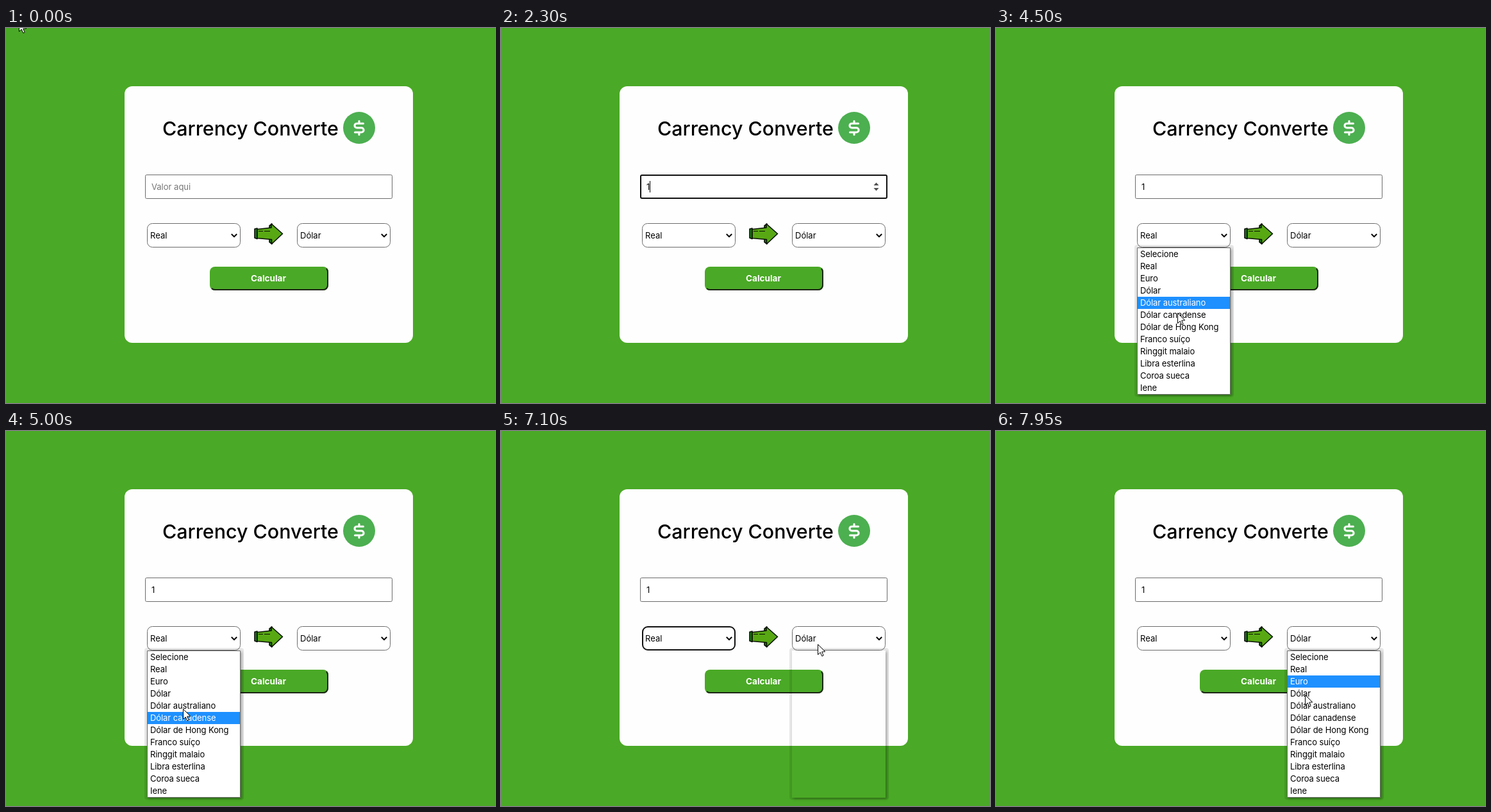
An HTML page with a canvas that plays this animation: 763 by 586 pixels, repeating every 8 s.

```html
<!DOCTYPE html>
<html lang="pt">
<head>
<meta charset="utf-8">
<title>Converter</title>
<style>
html, body { margin: 0; width: 100%; height: 100%; overflow: hidden; background: #4aa926; }
canvas { display: block; }
</style>
</head>
<body>
<canvas id="stage" width="763" height="586"></canvas>
<script>
const ctx = document.getElementById('stage').getContext('2d');
const LOOP = 8000, STEP = 50;
const GREEN = '#4aa926';
const OPTIONS = ['Selecione', 'Real', 'Euro', 'Dólar', 'Dólar australiano', 'Dólar canadense',
  'Dólar de Hong Kong', 'Franco suíço', 'Ringgit malaio', 'Libra esterlina', 'Coroa sueca', 'Iene'];
const ROW = 19, LIST_TOP = 343, LIST_H = OPTIONS.length * ROW + 2, LIST_W = 146;

const FOCUS = 1400, TYPE = 2300, BLINK = 475, POINTER_BACK = 3150;
const LIST_DELAY = 250, HOVER_LAG = 100;
const SELECTS = [
  { x: 220, label: 'Real', open: 3650, close: 6350 },
  { x: 454, label: 'Dólar', open: 7100, close: LOOP }
];

// Pointer moves; it rests in between
const HOME = { x: 20, y: -11 };
const MOVES = [
  { from: 350, to: 850, x: 462, y: 360 },
  { from: 850, to: 1000, x: 480, y: 307 },
  { from: TYPE, to: POINTER_BACK, x: 386, y: 322 },
  { from: POINTER_BACK, to: 3400, x: 300, y: 327 },
  { from: 3600, to: 3800, x: 291, y: 337 },
  { from: 4050, to: 4590, x: 281, y: 466 },
  { from: 4700, to: 5400, x: 269, y: 392 },
  { from: 5600, to: 5750, x: 268, y: 376 },
  { from: 6350, to: 6900, x: 494, y: 333 },
  { from: 7450, to: 7950, x: 482, y: 412 }
];

const between = (t, a, b) => t >= a && t < b;

function pointerAt(t) {
  let { x, y } = HOME;
  for (const m of MOVES) {
    const p = Math.min(1, Math.max(0, (t - m.from) / (m.to - m.from)));
    x += (m.x - x) * p;
    y += (m.y - y) * p;
  }
  return { x: Math.round(x), y: Math.round(y) };
}

// The highlight trails the pointer a little
function activeRow(t, label) {
  const row = Math.floor((pointerAt(t - HOVER_LAG).y - LIST_TOP - 1) / ROW);
  return row < 0 ? OPTIONS.indexOf(label) : row;
}

function text(str, x, y, { size = 13, weight = 400, color = '#000', spacing = 0, align = 'left' } = {}) {
  ctx.font = `${weight} ${size}px Inter, "Open Sans", sans-serif`;
  ctx.letterSpacing = spacing + 'px';
  ctx.textAlign = align;
  ctx.fillStyle = color;
  ctx.fillText(str, x, y);
}

function box(x, y, w, h, r, fill) {
  ctx.beginPath();
  ctx.roundRect(x, y, w, h, r);
  ctx.fillStyle = fill;
  ctx.fill();
}

function frame(x, y, w, h, r, focus) {
  const line = focus ? 2 : 1;
  box(x + line / 2, y + line / 2, w - line, h - line, r, '#fff');
  ctx.strokeStyle = focus ? '#101010' : '#6b6b6b';
  ctx.lineWidth = line;
  ctx.stroke();
}

function path(d, fill, stroke, width = 1) {
  const p = new Path2D(d);
  if (fill) {
    ctx.fillStyle = fill;
    ctx.fill(p);
  }
  if (stroke) {
    ctx.strokeStyle = stroke;
    ctx.lineWidth = width;
    ctx.stroke(p);
  }
}

function drawCoin() {
  ctx.beginPath();
  ctx.arc(551, 156, 25, 0, Math.PI * 2);
  ctx.fillStyle = '#4caf50';
  ctx.fill();
  ctx.lineCap = ctx.lineJoin = 'round';
  path('M557.5 149.2H547.4a3.4 3.4 0 0 0 0 6.8H554.6a3.5 3.5 0 0 1 0 7H544.5M551 145.5V149M551 163V166.7',
    null, '#fff', 3.1);
  ctx.lineCap = 'butt';
}

function drawArrow() {
  const dark = '#1f7a1c', line = '#081004';
  ctx.lineJoin = 'round';
  path('M388 314L392 313V329.5L388 328ZM411 309L415 306V337.5L411 334.5Z', dark, line, 1.6);
  path('M392 314.5L414 312V306L431.5 321.5L414.5 337.5V330.5L392 328.5Z', '#58a813', line, 1.6);
  path('M394 317.5h7m2 0h9', null, line, 1.2);
}

function drawInput(t, pointer) {
  const focus = between(t, FOCUS, SELECTS[0].open + LIST_DELAY);
  const hover = between(pointer.x, 217, 603) && between(pointer.y, 229, 267);
  const typed = t >= TYPE;
  frame(217, 229, 386, 38, 2, focus);
  if (typed) text('1', 227, 253);
  else text('Valor aqui', 227, 253, { color: '#757575' });
  if (focus || hover) path('M581.5 246l4 -4.5l4 4.5ZM581.5 250l4 4.5l4 -4.5Z', '#505050');
  const blinkOn = Math.floor((t - (typed ? TYPE : FOCUS)) / BLINK) % 2 === 0;
  if (focus && blinkOn) box(typed ? 232 : 227, 239, 1, 18, 0, '#000');
}

function drawSelect(x, label, focus) {
  frame(x, 305, LIST_W, 38, 8, focus);
  text(label, x + 5, 329);
  ctx.lineJoin = 'miter';
  path(`M${x + 131.8} 322l4.2 4.2l4.2 -4.2`, null, '#000', 2);
}

function drawButton() {
  box(318, 373, 185, 37, 8, GREEN);
  // Dark bevel along the right and bottom edges
  ctx.beginPath();
  ctx.arc(495, 381, 7, -Math.PI / 4, 0);
  ctx.arc(495, 402, 7, 0, Math.PI / 2);
  ctx.arc(326, 402, 7, Math.PI / 2, Math.PI * 0.75);
  ctx.strokeStyle = '#1d2418';
  ctx.lineWidth = 2;
  ctx.stroke();
  text('Calcular', 409.5, 396, { size: 13.5, weight: 700, color: '#fff', align: 'center' });
}

function drawShadow(x) {
  ctx.save();
  ctx.beginPath();
  ctx.rect(0, 0, 763, 586);
  ctx.rect(x, LIST_TOP, LIST_W, LIST_H);
  ctx.clip('evenodd');
  box(x - 4, LIST_TOP - 4, LIST_W + 9, LIST_H + 7, 4, 'rgba(0,0,0,.09)');
  ctx.shadowColor = 'rgba(0,0,0,.3)';
  ctx.shadowBlur = 4;
  ctx.shadowOffsetX = ctx.shadowOffsetY = 2;
  box(x, LIST_TOP, LIST_W, LIST_H, 0, '#000');
  ctx.restore();
}

function drawList(x, active) {
  frame(x, LIST_TOP, LIST_W, LIST_H, 0, false);
  OPTIONS.forEach((name, i) => {
    const y = LIST_TOP + 1 + i * ROW;
    const on = i === active;
    if (on) box(x + 1, y, LIST_W - 2, ROW, 0, '#1e90ff');
    text(name, x + 5, y + 14, { color: on ? '#fff' : '#000', spacing: -0.08 });
  });
}

function drawDropdown(t, { x, label, open, close }) {
  if (!between(t, open, close)) return;
  drawShadow(x);
  if (t >= open + LIST_DELAY) drawList(x, activeRow(t, label));
}

function drawPointer({ x, y }) {
  ctx.lineJoin = 'round';
  path(`M${x + 0.5} ${y + 0.5}v16l3.7 -3.5l2.6 5.8l2.4 -1l-2.5 -5.7l5.1 -.3Z`, '#fff', '#000');
}

function draw(t) {
  const pointer = pointerAt(t);
  const [left, right] = SELECTS;
  ctx.fillStyle = GREEN;
  ctx.fillRect(0, 0, 763, 586);
  box(185, 91, 450, 401, 12, '#fefefe');
  text('Carrency Converte', 244, 168, { size: 30.4, weight: 500 });
  drawCoin();
  drawInput(t, pointer);
  drawSelect(left.x, left.label, between(t, left.close, right.open + LIST_DELAY));
  drawArrow();
  drawSelect(right.x, right.label, false);
  drawButton();
  SELECTS.forEach(s => drawDropdown(t, s));
  if (!between(t, TYPE, POINTER_BACK)) drawPointer(pointer);
}

const start = performance.now();
function tick() {
  const t = (performance.now() - start) % LOOP;
  draw(Math.floor(t / STEP) * STEP);
  requestAnimationFrame(tick);
}
tick();
</script>
</body>
</html>
```
